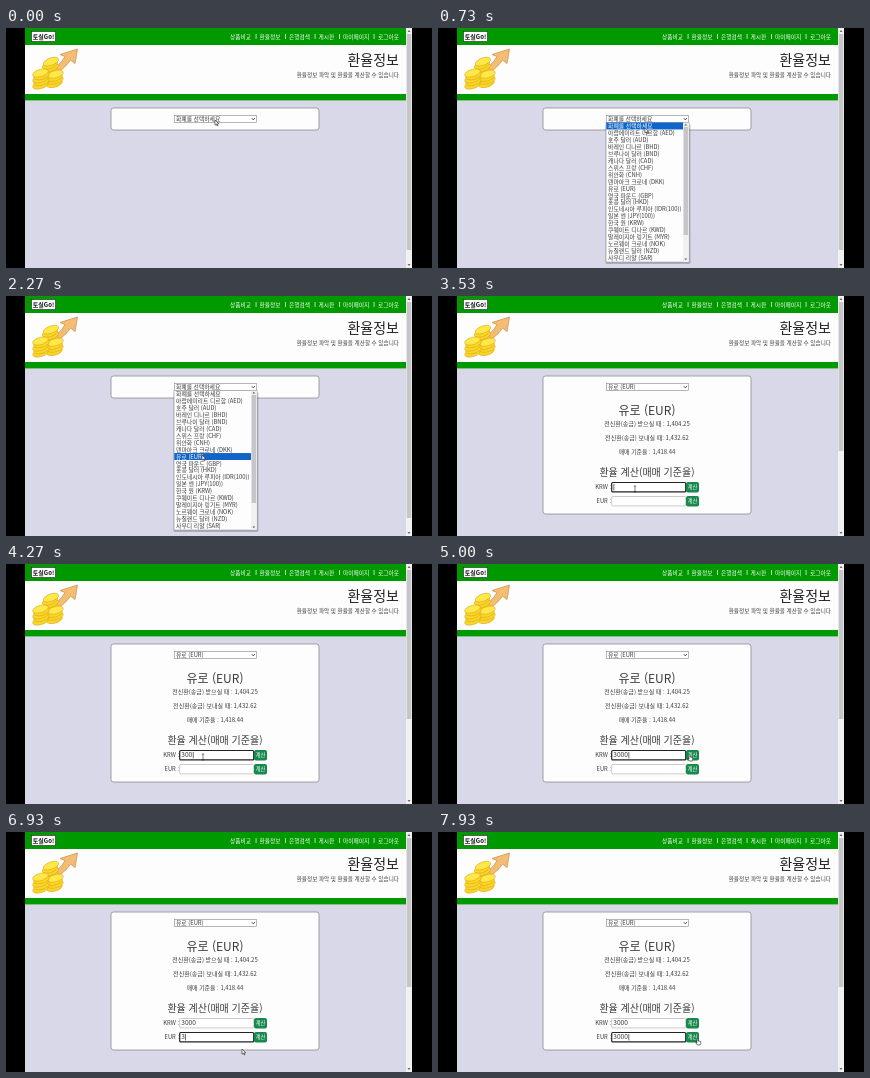
An HTML page that plays this animation: 426x240 px, repeating every 8000 ms.

```html
<!DOCTYPE html>
<html lang="ko">
<head>
<meta charset="utf-8">
<title>환율정보</title>
<style>
  html, body { margin: 0; width: 100%; height: 100%; overflow: hidden; background: #000; }
  svg { display: block; width: 100vw; height: 100vh; }
  text { font-family: "Noto Sans CJK KR", "Noto Sans CJK", "Noto Sans", sans-serif; white-space: pre; }
</style>
</head>
<body>
<svg id="stage" viewBox="0 0 426 240"></svg>
<script>
const LOOP = 8000, FPS = 15;
const OPEN = 600, PICK = 2600, FOCUS = 3400, CALC = 5130, REFOCUS = 5900;
const GREEN = "#009900", INK = "#3a3a3a", PAPER = "#fdfdfd";
const stage = document.getElementById("stage");

function add(parent, name, attrs, content) {
  const el = document.createElementNS("http://www.w3.org/2000/svg", name);
  for (const key in attrs) el.setAttribute(key, attrs[key]);
  if (content !== undefined) el.textContent = content;
  parent.appendChild(el);
  return el;
}
const rect = (parent, x, y, width, height, fill, more) =>
  add(parent, "rect", { x, y, width, height, fill, ...more });
const label = (parent, x, y, size, content, more) =>
  add(parent, "text", { x, y, "font-size": size, fill: INK, ...more }, content);
const path = (parent, d, more) => add(parent, "path", { d, fill: "none", ...more });
const show = (el, on) => el.setAttribute("display", on ? "inline" : "none");
const MID = { "text-anchor": "middle" }, END = { "text-anchor": "end" };

// Page
rect(stage, 19, 0, 387, 240, "#d8d8e8");
rect(stage, 19, 17, 381, 49, PAPER);
rect(stage, 19, 0, 381, 17, GREEN);
rect(stage, 19, 66, 381, 6.4, GREEN);
rect(stage, 25.5, 3.5, 24, 10, "#fff", { stroke: "#222", "stroke-width": 0.6 });
label(stage, 37.5, 10.8, 6, "토실Go!", { ...MID, "font-weight": 700, fill: "#111" });

const nav = { 상품비교: 224, 환율정보: 253.5, 은행검색: 283, 게시판: 312.5, 마이페이지: 337, 로그아웃: 372 };
for (const item in nav) label(stage, nav[item], 10.6, 5.7, item, { fill: "#fff", "font-weight": 500 });
for (const x of [250, 279.5, 309, 333.5, 368])
  rect(stage, x - 0.3, 6, 0.7, 5, "#fff");
label(stage, 393, 37, 14, "환율정보", { ...END, fill: "#222" });
label(stage, 393, 49.2, 5.62, "환율정보 파악 및 환율을 계산할 수 있습니다", END);

// Arrow and coins
path(stage, "M44 42Q54 38 59 28.5L54 26.5L71.5 21L69 35.5L64.5 32Q58 42 47 46Z",
  { fill: "#f5bd72", stroke: "#cf9355", "stroke-width": 0.8 });
function coins(cx, bottom, count, tilt) {
  for (let i = 0; i < count; i++) {
    const cy = bottom - i * 3, top = i === count - 1;
    add(stage, "ellipse", { cx: cx + (i % 2), cy, rx: 8, ry: 3.6, transform: `rotate(${tilt} ${cx} ${cy})`,
      fill: top ? "#ffe94a" : "#f9d62a", stroke: "#dfa812", "stroke-width": 0.6 });
  }
}
coins(44, 43, 4, -20);
coins(48.5, 55.5, 4, -16);
coins(34.5, 57, 5, -16);

// Page scrollbar
rect(stage, 400, 0, 6, 240, "#f1f1f1");
const thumb = rect(stage, 400.7, 6, 4.6, 216, "#c6c6ca");
path(stage, "M401.5 4L403 2L404.5 4ZM401.5 236L403 238L404.5 236Z", { fill: "#666" });

// Panel
const panel = rect(stage, 105, 80, 208, 22, PAPER, { rx: 2.5, stroke: "#8c8c8c", "stroke-width": 0.8 });
rect(stage, 168.5, 87.5, 82, 7, "#fff", { stroke: "#888", "stroke-width": 0.6 });
const chosen = label(stage, 170, 93.2, 5.8, "");
path(stage, "M245.8 90.2L247.3 91.9L248.8 90.2", { stroke: "#222", "stroke-width": 0.8 });

// Exchange rates
const rates = add(stage, "g", {});
label(rates, 209, 118.5, 12, "유로 (EUR)", MID);
label(rates, 209, 130.2, 6, "전신환(송금) 받으실 때 : 1,404.25", MID);
label(rates, 209, 144, 6, "전신환(송금) 보내실 때: 1,432.62", MID);
label(rates, 209, 157.8, 5.9, "매매 기준율 : 1,418.44", MID);
label(rates, 209, 180, 10, "환율 계산(매매 기준율)", MID);

function field(code, y) {
  label(rates, 173, y + 7.3, 5.8, code + " :", END);
  const box = rect(rates, 173.7, y + 0.5, 74, 9.4, "#fff", { rx: 1 });
  const value = label(rates, 175.3, y + 7.3, 6.6, "");
  const caret = rect(rates, 176, y + 2, 0.6, 6.4, "#111");
  rect(rates, 248, y, 13, 10.4, "#168a4c", { rx: 2 });
  label(rates, 254.5, y + 7.2, 5.2, "계산", { ...MID, fill: "#fff" });
  return (str, focused, blink) => {
    value.textContent = str;
    box.setAttribute("stroke", focused ? "#222" : "#aaa");
    box.setAttribute("stroke-width", focused ? 1.2 : 0.6);
    caret.setAttribute("x", 175.6 + str.length * 3.75);
    show(caret, focused && blink);
  };
}
const won = field("KRW", 186), euro = field("EUR", 200);

// Currency list
const PROMPT = "화폐를 선택하세요", ROW = 6.95, TOP = 94.5;
const items = [PROMPT, "아랍에미리트 디르함 (AED)", "호주 달러 (AUD)", "바레인 디나르 (BHD)",
  "브루나이 달러 (BND)", "캐나다 달러 (CAD)", "스위스 프랑 (CHF)", "위안화 (CNH)",
  "덴마아크 크로네 (DKK)", "유로 (EUR)", "영국 파운드 (GBP)", "홍콩 달러 (HKD)",
  "인도네시아 루피아 (IDR(100))", "일본 엔 (JPY(100))", "한국 원 (KRW)", "쿠웨이트 디나르 (KWD)",
  "말레이지아 링기트 (MYR)", "노르웨이 크로네 (NOK)", "뉴질랜드 달러 (NZD)", "사우디 리얄 (SAR)"];
const list = add(stage, "g", {});
rect(list, 167.5, TOP + 1.5, 85, 140, "#000", { rx: 1.5, opacity: 0.2 });
rect(list, 168, TOP, 83, 139.5, PAPER, { stroke: "#888", "stroke-width": 0.5 });
const mark = rect(list, 168.3, TOP, 76.7, ROW, "#0f65c8");
const rows = items.map((item, i) => label(list, 170, TOP + i * ROW + 5.5, 5.85, item));
rect(list, 245, TOP + 0.3, 5.7, 139, "#f1f1f1");
rect(list, 245.6, 99, 4.5, 108, "#c6c6ca");
path(list, "M246.3 97.6L247.8 95.8L249.3 97.6ZM246.3 230.5L247.8 232.3L249.3 230.5Z", { fill: "#666" });

// Pointer shapes
const pointer = add(stage, "g", {});
const thin = { stroke: "#222", "stroke-width": 0.6 };
const arrow = path(pointer, "M0 0V5.2L1.3 4.1L2.2 6L3 5.6L2.2 3.8H3.8Z", { ...thin, fill: "#fff" });
const beam = path(pointer, "M-1.2 -3H1.2M0 -3V3M-1.2 3H1.2", thin);
const hand = path(pointer, "M0 0Q.8 -.7 1.2 .3V2L3.6 2.5Q4.2 4.4 3.2 6H.4L-1.3 3.5L0 3.7Z", { ...thin, fill: "#fff" });

// time, x, y
const track = [[0, 209, 92], [600, 209, 92], [1000, 201, 122], [1450, 196, 165], [1850, 195, 166],
  [2200, 196, 159], [2650, 196, 159], [3400, 197, 193], [4500, 197, 193], [4950, 251, 191],
  [5250, 251, 191], [5800, 216, 205], [6100, 216, 205], [6600, 236, 217], [7450, 236, 217], [7900, 259, 207]];

function pointerAt(t) {
  const i = track.findIndex(p => p[0] > t);
  if (i < 0) return track[track.length - 1].slice(1);
  const [t0, x0, y0] = track[i - 1], [t1, x1, y1] = track[i];
  const u = (t - t0) / (t1 - t0), k = u * u * (3 - 2 * u);
  return [x0 + (x1 - x0) * k, y0 + (y1 - y0) * k];
}

const typed = (t, start, step) =>
  "3000".slice(0, Math.max(0, Math.min(4, Math.floor((t - start) / step) + 1)));

function draw(t) {
  const [x, y] = pointerAt(t);
  const open = t >= OPEN && t < PICK, picked = t >= PICK;
  show(list, open);
  show(rates, picked);
  panel.setAttribute("height", picked ? 138 : 22);
  thumb.setAttribute("height", picked ? 149 : 216);
  chosen.textContent = picked ? "유로 (EUR)" : PROMPT;

  const hover = Math.max(0, Math.floor((y - TOP) / ROW));
  mark.setAttribute("y", TOP + hover * ROW);
  rows.forEach((row, i) => row.setAttribute("fill", i === hover ? "#fff" : INK));

  const blink = t % 1000 < 550;
  const result = t >= CALC && t < 6500 ? "2.11" : typed(t, 6850, 150);
  won(typed(t, 3900, 150), t >= FOCUS && t < CALC, blink);
  euro(result, t >= REFOCUS, blink || t > 6800);

  const inside = picked && y > 186 && y < 210;
  const overButton = inside && x > 248 && x < 261;
  const overField = inside && x > 174 && x <= 248;
  pointer.setAttribute("transform", `translate(${x} ${y})`);
  show(hand, overButton);
  show(beam, overField);
  show(arrow, !overButton && !overField);
}

const begin = performance.now();
function tick() {
  const t = (performance.now() - begin) % LOOP;
  draw(Math.floor((t + 5) * FPS / 1000) * 1000 / FPS);
  requestAnimationFrame(tick);
}
tick();
</script>
</body>
</html>
```
